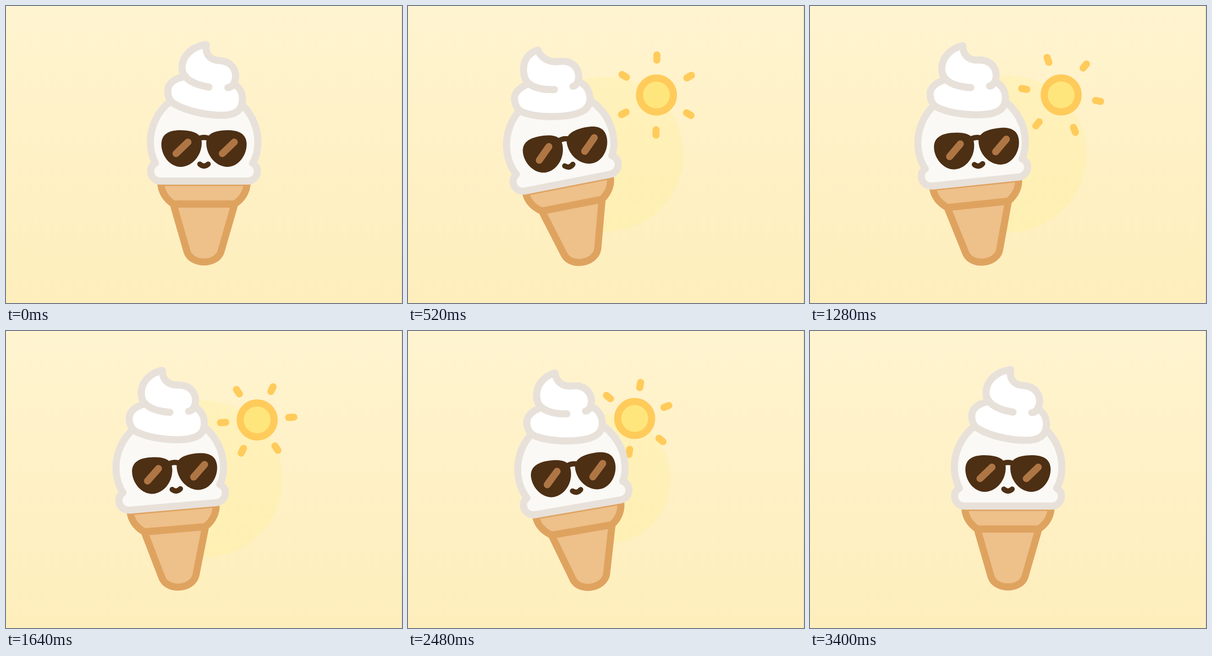
Write an HTML page that moves like this. It is 864x648 px and loops after 3.44 s.

```html
<!DOCTYPE html>
<html lang="en">
<head>
<meta charset="utf-8">
<title>Cool ice cream</title>
<style>
  html, body { margin: 0; width: 100%; height: 100%; overflow: hidden; background: #fef1c7; }
  svg { display: block; width: 100vw; height: 100vh; }
  .line { fill: none; stroke-linecap: round; stroke-linejoin: round; stroke-width: 15.5; }
  .cone { fill: #eec08a; stroke: #dfa360; }
  .scoop { fill: #faf9f5; stroke: #e8e1da; }
  .swirl { fill: #fff; stroke: #e8e1da; }
  .dark { fill: #4d2f14; }
  .frame { stroke: #4d2f14; stroke-width: 11.5; }
  .shine { stroke: #af7645; }
  .ray { stroke: #ffcb5b; }
  .disc { fill: #ffe67c; stroke: #ffcb5b; }
</style>
</head>
<body>
<svg viewBox="0 0 864 648" preserveAspectRatio="none">
  <defs>
    <linearGradient id="sky" x1="0" y1="0" x2="0" y2="1">
      <stop offset="0" stop-color="#fff4d0"/>
      <stop offset="1" stop-color="#feeebc"/>
    </linearGradient>
    <path id="lens" d="M339 302 C339 279 356 271 380 271 C400 271 415 275 422 283 C426 288 427 293 427 300 C426 330 403 351 381 351 C358 351 339 327 339 302 Z"/>
  </defs>
  <rect width="864" height="648" fill="url(#sky)"/>
  <rect x="863" width="1" height="648" fill="#dcd5bd"/>
  <circle id="glow" cx="432" cy="323" fill="#ffec80" opacity=".22"/>
  <g id="sun">
    <g id="rays"></g>
    <circle class="line disc" r="37"/>
  </g>
  <g id="cream">
    <path class="line cone" d="M365 432 L395 536 C400 551 416 558.5 432 558.5 C448 558.5 464 551 469 536 L499 432 Z"/>
    <path class="line cone" d="M338 385 C338 405 349 421 365 432 L499 432 C515 421 526 405 526 385 Z"/>
    <path class="line scoop" d="M357 209 C330 231 315 264 315 297 C315 314 319 330 326 343 C319 347 315.5 353 315.5 360 C315.5 373 325 382 338 382 L526 382 C539 382 548.5 373 548.5 360 C548.5 353 545 347 538 343 C546 330 549.5 314 549.5 297 C549.5 267 538 240 518 218 Z"/>
    <path class="line swirl" d="M385 155 C365 160 353 170 353 185 C353 200 358 209 370 215 C396 230 440 238.5 470 238.5 C500 238.5 516 228 516 203 C516 190 510 178 499 171"/>
    <path class="line swirl" id="tip"/>
    <g id="face">
      <use class="dark" href="#lens"/>
      <use class="dark" href="#lens" transform="matrix(-1 0 0 1 864 0)"/>
      <path class="line frame" d="M420 290 C426 285.5 438 285.5 444 290"/>
      <path class="line shine" d="M371 322 L397 297 M472 322 L498 297"/>
      <path class="line frame" d="M423 345 C429 350.5 435 350.5 441 345"/>
    </g>
  </g>
</svg>
<script>
  const LOOP = 3440;
  const TAU = Math.PI * 2;
  const el = id => document.getElementById(id);
  const [glow, sun, rays, cream, tip, face] =
    ['glow', 'sun', 'rays', 'cream', 'tip', 'face'].map(el);

  // Cubic ease in and out between two times, from 0 to 1
  function ease(t, from, to) {
    const u = Math.min(1, Math.max(0, (t - from) / (to - from)));
    return u < 0.5 ? 4 * u ** 3 : 1 - 4 * (1 - u) ** 3;
  }

  // Sine ease through [time, value] pairs
  function sway(t, keys) {
    for (let i = 1; i < keys.length; i++) {
      const [t0, v0] = keys[i - 1], [t1, v1] = keys[i];
      if (t <= t1) return v0 + (v1 - v0) * (1 - Math.cos(Math.PI * (t - t0) / (t1 - t0))) / 2;
    }
    return keys[keys.length - 1][1];
  }

  const pulse = (t, inEnd, outStart, outEnd) => ease(t, 0, inEnd) - ease(t, outStart, outEnd);

  const LEAN = [[560, -11.1], [820, -11.2], [1500, -4.3], [2260, -11.7]];
  const BEND = [[0, 0], [560, -13], [1450, -1], [2160, -12], [2800, 3], [3080, -1.5], [3380, 1], [3440, 0]];

  function lean(t) {
    if (t < 560) return -11.1 * ease(t, 0, 560);
    if (t < 2260) return sway(t, LEAN);
    return -11.7 * (1 - ease(t, 2260, 2900));
  }

  function tipPath(dx) {
    const dy = Math.abs(dx) * 0.12;
    const at = (x, y, k) => `${x + dx * k} ${y + dy * k}`;
    return `M443 177 C410 172 384 158 384 135 C384 110 ${at(405, 88, 0.8)} ${at(437, 84, 1)}` +
      ` C${at(434, 105, 0.5)} 445 118 465 119 C488 120 501 135 501 153 C501 165 494 178 484 178`;
  }

  for (let i = 0; i < 6; i++) {
    const ray = document.createElementNS('http://www.w3.org/2000/svg', 'path');
    ray.setAttribute('class', 'line ray');
    ray.setAttribute('d', 'M0 -5.7 V5.7');
    rays.append(ray);
  }

  function draw(t) {
    const x = -52 * pulse(t, 700, 2160, 2840);
    cream.setAttribute('transform', `translate(${x} 0) rotate(${lean(t)} 432 566)`);
    face.setAttribute('transform', `translate(${10.5 * pulse(t, 680, 2120, 2760)} 0)`);
    tip.setAttribute('d', tipPath(sway(t, BEND)));
    glow.setAttribute('r', Math.max(0, 171 * pulse(t, 610, 2240, 2920)));

    const out = ease(t, 2160, 2820);
    const sunX = 432 + 116 * pulse(t, 680, 2160, 2820);
    const sunY = 194 + 106 * (1 - ease(t, 0, 560)) + 106 * out * out - 103 * out * (1 - out);
    sun.setAttribute('transform', `translate(${sunX} ${sunY})`);

    const turn = 0.129 * t - 6 - (548 - sunX) * 0.09;
    const reach = 77.8 + 4 * Math.cos(TAU * (t - 520) / 800);
    [...rays.children].forEach((ray, i) =>
      ray.setAttribute('transform', `rotate(${turn + i * 60}) translate(0 ${-reach})`));
  }

  const start = performance.now();
  function tick() {
    draw((performance.now() - start) % LOOP);
    requestAnimationFrame(tick);
  }
  draw(0);
  requestAnimationFrame(tick);
</script>
</body>
</html>
```
